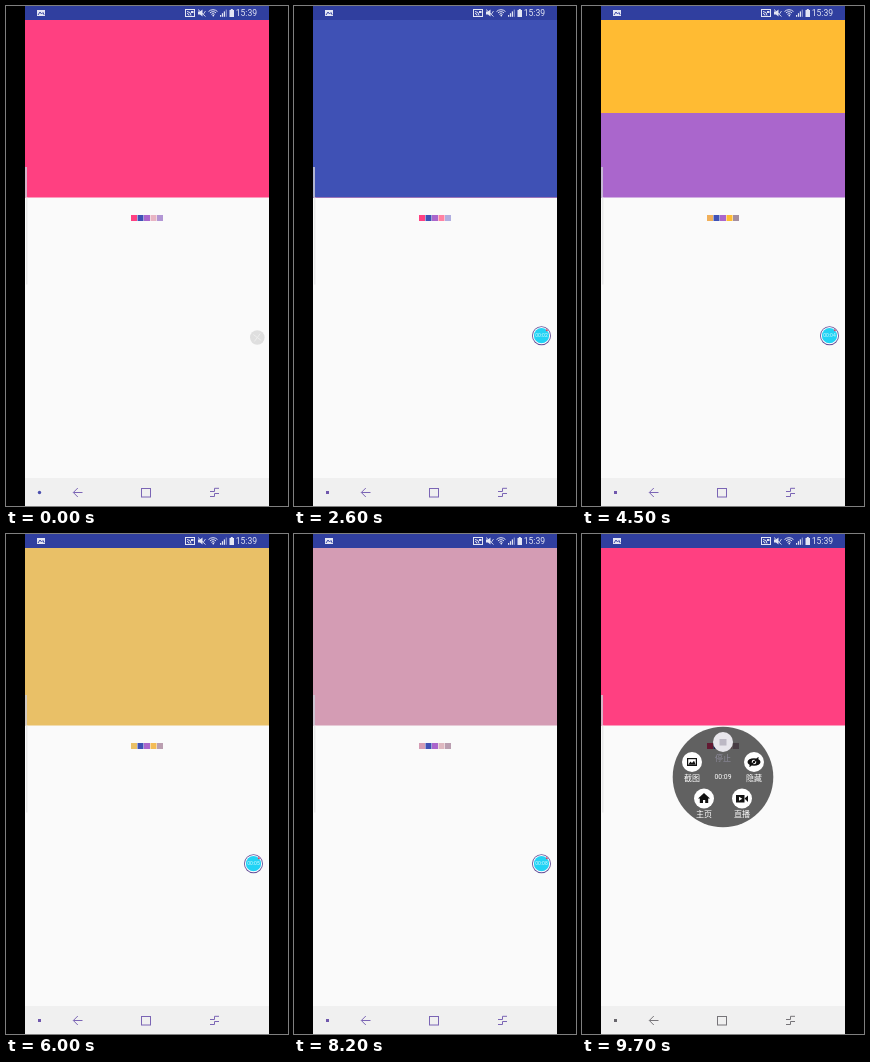
These frames come from a looping animation (282x500 px, 9800 ms). An HTML page with a canvas:

```html
<!DOCTYPE html>
<html lang="zh-CN">
<head>
<meta charset="utf-8">
<title>Colour transitions</title>
<style>
html, body { margin: 0; width: 100%; height: 100%; overflow: hidden; background: #000; }
canvas { display: block; width: 282px; height: 500px; }
</style>
</head>
<body>
<canvas id="stage"></canvas>
<script>
const W = 282, H = 500, LOOP = 9800, STEP = 100;
const PINK = [255, 64, 129], BLUE = [63, 81, 181], PURPLE = [170, 102, 204];
const ORANGE = [255, 187, 51], MIST = [190, 203, 207];
const PANEL = { x: 19, y: 14, w: 244, h: 177.5 };
const LATIN = 'Roboto, sans-serif';
const CJK = '"Noto Sans CJK SC", "Noto Sans CJK", sans-serif';

const canvas = document.getElementById('stage');
const ctx = canvas.getContext('2d');
const ratio = window.devicePixelRatio || 1;
canvas.width = W * ratio;
canvas.height = H * ratio;

const rgb = c => `rgb(${c.map(Math.round).join(',')})`;
const mix = (a, b, p) => a.map((v, i) => v + (b[i] - v) * p);
const span = (t, start, length) => Math.min(1, Math.max(0, (t - start) / length));
const ease = p => (1 - Math.cos(Math.PI * p)) / 2;

function rect(x, y, w, h, color) {
  ctx.fillStyle = color;
  ctx.fillRect(x, y, w, h);
}

function disc(x, y, r, color) {
  ctx.fillStyle = color;
  ctx.beginPath();
  ctx.arc(x, y, r, 0, Math.PI * 2);
  ctx.fill();
}

function line(points, color, width = 1) {
  ctx.strokeStyle = color;
  ctx.lineWidth = width;
  ctx.beginPath();
  points.forEach(([x, y], i) => i ? ctx.lineTo(x, y) : ctx.moveTo(x, y));
  ctx.stroke();
}

function shape(points, color) {
  ctx.fillStyle = color;
  ctx.beginPath();
  points.forEach(([x, y]) => ctx.lineTo(x, y));
  ctx.fill();
}

function label(text, x, y, size, color, family = LATIN) {
  ctx.font = `${size}px ${family}`;
  ctx.textAlign = 'center';
  ctx.textBaseline = 'middle';
  ctx.fillStyle = color;
  ctx.fillText(text, x, y);
}

function panelBase(t) {
  if (t >= 7790) return mix(MIST, PINK, span(t, 7790, 1200));
  if (t >= 5600) return mix(ORANGE, MIST, span(t, 5600, 1200));
  if (t >= 4263) return PURPLE;
  return t >= 2680 ? BLUE : PINK;
}

function drawPanel(t) {
  const { x, y, w, h } = PANEL;
  rect(x, y, w, h, rgb(panelBase(t)));
  if (t < 2680) {
    rect(x, y, w * ease(span(t, 1101, 500)), h, rgb(BLUE));
  } else if (t < 4263) {
    ctx.save();
    ctx.beginPath();
    ctx.rect(x, y, w, h);
    ctx.clip();
    disc(x + w / 2, y + h / 2, Math.hypot(w, h) / 2 * ease(span(t, 2680, 500)), rgb(PURPLE));
    ctx.restore();
  } else if (t < 5600) {
    rect(x, y, w, h * ease(span(t, 4263, 460)), rgb(ORANGE));
  }
}

// The first and the two last swatches shift in tone with the panel.
function drawSwatches(t) {
  let first = PINK, fourth = [232, 180, 195], last = [178, 150, 212];
  if (t >= 5600) {
    first = panelBase(t);
    fourth = t < 7790 ? mix(ORANGE, [222, 190, 150], span(t, 5600, 1200)) : [222, 184, 192];
    last = [186, 158, 176];
  } else if (t >= 4263) {
    first = [240, 175, 90]; fourth = ORANGE; last = [164, 142, 160];
  } else if (t >= 2680) {
    first = PURPLE; fourth = [214, 194, 214]; last = [174, 154, 198];
  } else if (t >= 1000) {
    fourth = [255, 130, 162]; last = [176, 174, 224];
  }
  [first, BLUE, PURPLE, fourth, last].forEach((c, i) =>
    rect(125 + i * 6.5, 209, 6, 6, rgb(c)));
}

function drawStatus() {
  const ink = '#e4e6f4';
  rect(19, 0, 244, 14, '#303f9f');
  rect(31, 4, 8, 6, ink);
  line([[32, 9], [34, 6], [35.5, 8], [37, 6.5], [38.2, 9]], '#303f9f', 0.9);

  ctx.strokeStyle = ink;
  ctx.lineWidth = 1;
  ctx.strokeRect(179.5, 3.5, 9, 7);
  for (const r of [2, 4]) {
    ctx.beginPath();
    ctx.arc(181, 9.5, r, -Math.PI / 2, 0);
    ctx.stroke();
  }
  rect(185, 5, 2.5, 2, ink);

  shape([[192, 5.5], [194, 5.5], [196.5, 3.5], [196.5, 10.5], [194, 8.5], [192, 8.5]], ink);
  line([[192, 3.5], [199.5, 10.5]], ink, 0.9);
  line([[197.5, 8], [199.5, 5]], ink, 0.8);

  ctx.lineWidth = 1;
  for (const r of [2.3, 4.3, 6.3]) {
    ctx.beginPath();
    ctx.arc(207, 10, r, -Math.PI * 0.75, -Math.PI * 0.25);
    ctx.stroke();
  }
  disc(207.3, 9.6, 0.9, ink);
  for (let i = 0; i < 4; i++) rect(214 + i * 1.9, 9 - i * 1.8, 1.2, 1.8 + i * 1.8, i < 3 ? ink : '#8c95cb');
  rect(223.5, 4, 4.5, 7, ink);
  rect(224.8, 3, 2, 1, ink);
  label('15:39', 240.4, 7.3, 8.6, ink);
}

function drawNav(t) {
  const ink = t >= 8900 ? '#777579' : '#7b65b5';
  rect(19, 472, 244, 28, '#f0f0f0');
  if (t < 100) disc(33.5, 486.5, 1.7, '#4b4fae');
  else rect(32, 485, 3, 3, t >= 8900 ? '#68666c' : '#7058ad');
  line([[76.5, 486.5], [67.5, 486.5]], ink);
  line([[71.8, 482], [67.3, 486.5], [71.8, 491]], ink);
  ctx.strokeRect(135.5, 482.5, 9, 8.5);
  line([[213, 482.3], [208.5, 482.3], [208.5, 485.5], [204, 485.5]], ink);
  line([[204, 490.5], [208.5, 490.5], [208.5, 487.5], [213, 487.5]], ink);
}

function clock(t) {
  const ticks = [1000, 2200, 3200, 4100, 5100, 6100, 7000, 8000, 9000];
  return '00:0' + ticks.filter(k => t >= k).length;
}

function drawBubble(t) {
  if (t >= 8900) return;
  const p = span(t, 0, 400);
  const x = 251.3 - 3.8 * p, y = 331.5 - 1.8 * p;
  if (p < 1) {
    ctx.globalAlpha = 1 - p;
    disc(x, y, 7.3, '#dfdfdf');
    line([[x - 4, y - 3], [x + 4, y + 3]], '#eeeeee');
    line([[x - 3, y + 4], [x + 3, y - 4]], '#eeeeee');
  }
  ctx.globalAlpha = p;
  disc(x, y, 9.5, '#66519a');
  disc(x, y, 8.6, '#ffffff');
  disc(x, y, 7.6, '#22d3f5');
  disc(x + 5.3, y - 5.4, 1, '#d84a68');
  label(clock(t), x, y + 0.3, 5, '#d9f8ff');
  ctx.globalAlpha = 1;
}

function button(x, y, text) {
  disc(x, y, 10, '#ffffff');
  label(text, x, y + 15.7, 8, '#ffffff', CJK);
}

function drawMenu(t) {
  const p = ease(span(t, 8800, 400));
  if (!p) return;
  ctx.save();
  ctx.translate(141, 243);
  ctx.scale(p, p);
  ctx.translate(-141, -243);
  disc(141, 243, 50.3, 'rgba(0,0,0,.61)');
  const ink = '#111111';

  button(110, 228, '截图');
  rect(105, 224, 10, 8, ink);
  rect(106.2, 225.2, 7.6, 5.6, '#ffffff');
  shape([[106.2, 230.8], [108.5, 227.5], [110, 229], [112, 226.8], [113.8, 230.8]], ink);

  button(172, 228, '隐藏');
  ctx.fillStyle = ink;
  ctx.beginPath();
  ctx.ellipse(172, 228, 6.5, 3.8, 0, 0, Math.PI * 2);
  ctx.fill();
  disc(172, 228, 2.3, '#ffffff');
  disc(172, 228, 1.2, ink);
  line([[167.5, 232.5], [176.5, 223.5]], ink, 1.2);

  button(122, 264.5, '主页');
  shape([[116, 264.5], [122, 259], [128, 264.5]], ink);
  rect(117.8, 264, 8.4, 5, ink);
  rect(121, 266, 2.2, 3, '#ffffff');

  button(160, 264.5, '直播');
  rect(154, 261, 8.5, 7.5, ink);
  shape([[162.5, 264.5], [166, 261.5], [166, 268]], ink);
  shape([[157, 262.7], [160.3, 264.7], [157, 266.7]], '#ffffff');

  const pressed = t >= 9700;
  disc(141, 208, 10, pressed ? '#e8e6ec' : '#ffffff');
  rect(137.5, 205, 7, 6.5, pressed ? '#bcb8c4' : ink);
  label('停止', 141, 223.7, 8, pressed ? '#8f8c9d' : '#ffffff', CJK);
  label('00:09', 141, 243.3, 6.8, '#ffffff');
  ctx.restore();
}

function draw(t) {
  ctx.setTransform(ratio, 0, 0, ratio, 0, 0);
  rect(0, 0, W, H, '#000');
  rect(19, 0, 244, H, '#fafafa');
  drawPanel(t);
  rect(19, 161, 2, 30.5, 'rgba(205,205,215,.8)');
  rect(20, 191.5, 1.5, 87, '#e9e9ea');
  drawSwatches(t);
  drawStatus();
  drawNav(t);
  drawBubble(t);
  drawMenu(t);
}

const begun = performance.now();
function frame() {
  const t = (performance.now() - begun) % LOOP;
  draw(Math.floor(t / STEP) * STEP);
  requestAnimationFrame(frame);
}
frame();
</script>
</body>
</html>
```
